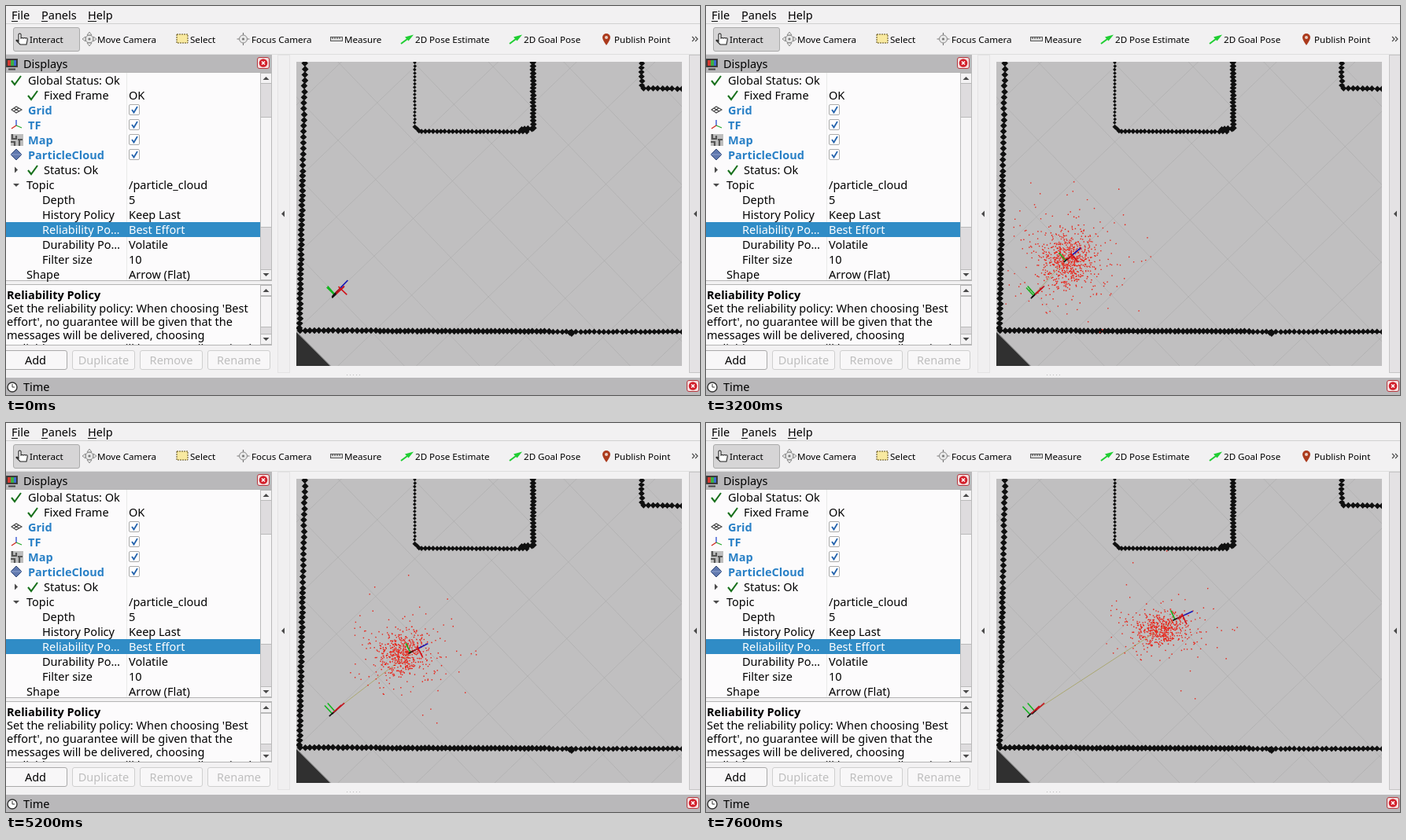
An HTML page for the animation above (7700 ms loop, 882x495 px).

```html
<!DOCTYPE html>
<html lang="en">
<head>
<meta charset="utf-8">
<style>
  html, body { margin: 0; width: 100%; height: 100%; overflow: hidden; background: #f2f1f2; }
  svg { display: block; width: 882px; height: 495px; font: 14.5px "Noto Sans", sans-serif; }
  text { white-space: pre; fill: #000; }
  .tool { font-size: 11.6px; }
  .link { font-weight: bold; fill: #2980c6; }
  .bold { font-weight: bold; }
  .light { fill: #fff; }
  .off { fill: #bebebe; }
  .mid { text-anchor: middle; }
</style>
</head>
<body>
<svg viewBox="0 0 882 495">
  <defs>
    <clipPath id="view"><rect x="369" y="71" width="490" height="387"/></clipPath>
    <clipPath id="help"><rect x="0" y="356" width="322" height="75"/></clipPath>
  </defs>
  <g id="panel"></g>
  <g clip-path="url(#view)">
    <rect x="369" y="71" width="490" height="387" fill="#c0bfc0"/>
    <path id="grid" stroke="#aaa" stroke-opacity=".6" fill="none"/>
    <path d="M369 415L412 458H369Z" fill="#303030"/>
    <path d="M369 414.5L412.5 458" stroke="#777"/>
    <path id="walls" fill="#101010"/>
    <path id="link" stroke="#a6a25e" stroke-opacity=".8" fill="none"/>
    <path id="cloud" stroke="#e8261b" stroke-width="1.4" fill="none"/>
    <g id="frames" fill="none"></g>
  </g>
</svg>
<script>
const $ = id => document.getElementById(id);

function seeded(seed) {
  return () => {
    seed = (seed * 1664525 + 1013904223) >>> 0;
    return (seed + .5) / 4294967296;
  };
}

// Panel markup
const titleColor = '#b9b8ba';
const rect = (x, y, w, h, fill, extra = '') =>
  `<rect x="${x}" y="${y}" width="${w}" height="${h}" fill="${fill}" ${extra}/>`;
const text = (x, y, s, cls = '') => `<text x="${x}" y="${y}" class="${cls}">${s}</text>`;
const path = (d, stroke, width = 1, fill = 'none') =>
  `<path d="${d}" stroke="${stroke}" stroke-width="${width}" fill="${fill}"/>`;
const tick = (x, y) => path(`M${x} ${y}l4 5l8-11`, '#18701c', 2.1);
const closeBox = (x, y) => rect(x, y, 15, 14, '#f4dfe0', 'rx="2.5" stroke="#b5383f"') +
  `<circle cx="${x + 7.5}" cy="${y + 7}" r="5.3" fill="#d3202b"/>` +
  path(`M${x + 5.5} ${y + 5}l4 4m0-4l-4 4`, '#fff', 1.5);
const triangle = (x, y, angle, size = 4) =>
  `<path d="M${size / 2} 0L${-size / 2} ${-size}V${size}Z" transform="translate(${x} ${y}) rotate(${angle})" fill="#4a4a4a"/>`;

function scrollbar(top, bottom, from, to) {
  return rect(323.5, top + .5, 14, bottom - top - 1, '#dedcde', 'stroke="#bbb"') +
    rect(323.5, from + .5, 14, to - from, '#f5f4f5', 'stroke="#bababa"') +
    rect(323.5, top + .5, 14, 13, '#f3f2f3', 'stroke="#bababa"') +
    rect(323.5, bottom - 13.5, 14, 13, '#f3f2f3', 'stroke="#bababa"') +
    triangle(330.5, top + 7, -90) + triangle(330.5, bottom - 7, 90);
}

function toolbar() {
  const arrow = x => path(`M${x} 48l8-6`, '#1fce32', 2) +
    `<path d="M${x + 5} 39.5l11-3-6.5 8Z" fill="#1fce32"/>`;
  const target = (x, y) => path(`M${x - 8} ${y}h16M${x} ${y - 8}v16`, '#777', 1.2) +
    `<circle cx="${x}" cy="${y}" r="5" fill="#e8e8e8" stroke="#888"/>` +
    `<circle cx="${x}" cy="${y}" r="1.6" fill="#777"/>`;
  const labels = [[30, 'Interact'], [116, 'Move Camera'], [234, 'Select'], [312, 'Focus Camera'],
    [430, 'Measure'], [520, '2D Pose Estimate'], [658, '2D Goal Pose'], [773, 'Publish Point']];
  return rect(9.5, 27.5, 84, 30, '#d6d5d6', 'rx="2.5" stroke="#aaa"') +
    path('M16 45V36q1.5-2 3 0v5q2-1 3 0 2-1 3 0 3-1 2 3l-1 5h-8l-5-5q0-2 3 1Z', '#222', 1.1, '#fff') +
    target(106, 42) + path('M106 33l-3 4h6ZM106 51l-3-4h6ZM97 42l4-3v6ZM115 42l-4-3v6Z', '#777', .8, '#eee') +
    rect(217, 36, 14, 11, '#f8e9a0', 'stroke="#5c4d16" stroke-dasharray="2 1"') +
    target(301.5, 42) +
    rect(412.5, 39.5, 15, 5, '#ddd', 'stroke="#555"') + path('M415 40v2m3-2v2m3-2v2m3-2v2', '#333') +
    arrow(502) + arrow(640) +
    '<path d="M763 50q-5-7-5-10a5 5 0 0 1 10 0q0 3-5 10Z" fill="#ab3a1c"/><circle cx="763" cy="40" r="2" fill="#e8cfc4"/>' +
    path('M872 39l3 3-3 3m4-6l3 3-3 3', '#444', 1.1) +
    labels.map(([x, s]) => text(x, 47, s, 'tool')).join('');
}

function tree() {
  const rows = [
    [28, 'Global Status: Ok'], [48, 'Fixed Frame', 'OK'], [28, 'Grid', true], [28, 'TF', true],
    [28, 'Map', true], [28, 'ParticleCloud', true], [48, 'Status: Ok'],
    [26, 'Topic', '/particle_cloud'], [46, 'Depth', '5'], [46, 'History Policy', 'Keep Last'],
    [46, 'Reliability Po…', 'Best Effort'], [46, 'Durability Po…', 'Volatile'],
    [46, 'Filter size', '10'], [26, 'Shape', 'Arrow (Flat)']];
  let out = rect(-.5, 84.5, 338, 265, '#fcfbfc', 'stroke="#b5b5b5"') +
    path('M153.5 85V349', '#e9e9e9') + rect(0, 275, 323, 19, '#308cc6');
  rows.forEach(([x, label, value], i) => {
    const y = 100 + 19 * i, box = value === true, cls = i === 10 ? 'light' : '';
    out += text(x, y, label, box ? 'link' : cls);
    if (box) out += rect(156.5, y - 12.5, 13, 13, '#fff', 'rx="1.5" stroke="#aaa"') +
      path(`M160 ${y - 6}l2.5 3.5 4.5-7.5`, '#2463ad', 1.8);
    else if (value) out += text(156, y, value, cls);
  });
  return out + tick(7, 95) + tick(28, 114) + tick(28, 209) +
    triangle(13, 208.5, 0) + triangle(13, 228, 90) +
    path('M7 132l6-4 7 4-7 4ZM10 130l7 4M10 134l6-4', '#444', 1.1) +
    path('M13 152V145', '#2648d0', 1.3) + path('M13 152l-6 4', '#d02a22', 1.3) + path('M13 152l7 3', '#26a82c', 1.3) +
    rect(6, 163, 16, 15, '#bdbdbd') + path('M8 163v6h5v-4M6 173h5v5M15 170h6M17 170v8', '#555', 2.2) +
    path('M13 182l7 7-7 7-7-7Z', '#354b78', 1, '#6078ae') + path('M6 189h14', '#8fa2cc') +
    scrollbar(85, 349, 141, 281);
}

function help() {
  const lines = ["Set the reliability policy: When choosing 'Best", "effort', no guarantee will be given that the",
    'messages will be delivered, choosing', "'Reliable', messages will be sent until received"];
  return rect(-.5, 354.5, 338, 77, '#fcfbfc', 'stroke="#b5b5b5"') +
    '<g clip-path="url(#help)">' + text(1, 373, 'Reliability Policy', 'bold') +
    lines.map((s, i) => text(1, 390 + 17 * i, s)).join('') + '</g>' + scrollbar(355, 431, 369, 408);
}

function buildPanel() {
  const buttons = [[-2.5, 80, 'Add'], [84.5, 79, 'Duplicate'], [170.5, 79, 'Remove'], [256.5, 79, 'Rename']];
  const clock = (x, y) => `<circle cx="${x}" cy="${y}" r="6" fill="#fff" stroke="#333" stroke-width="1.4"/>` +
    path(`M${x} ${y - 4}v4h3`, '#333');
  $('panel').innerHTML = rect(0, 0, 882, 495, '#f2f1f2') + path('M0 22.5H882', '#d0d0d0') +
    [[7, 'File', 8], [45, 'Panels', 8], [104, 'Help', 11]].map(([x, s, w]) =>
      text(x, 17, s) + path(`M${x} 19.5h${w}`, '#111')).join('') +
    toolbar() + path('M0 61.5H882', '#dedede') +
    rect(0, 62, 338, 22, titleColor) + text(22, 79, 'Displays') +
    rect(.5, 67.5, 14, 10, '#333', 'stroke="#444"') + rect(2, 69, 4, 7, '#d33b31') +
    rect(6, 69, 4, 7, '#3bae43') + rect(10, 69, 3, 7, '#3f6bd0') + path('M3 80.5h9', '#444', 2) +
    closeBox(319.5, 65.5) + tree() + help() +
    buttons.map(([x, w, s], i) => rect(x, 438.5, w, 24, '#f8f7f8', `rx="2.5" stroke="${i ? '#cfcfcf' : '#aaa'}"`) +
      text(x + w / 2, 456, s, i ? 'mid off' : 'mid')).join('') +
    rect(345.5, 62.5, 15, 404, '#f0eff0', 'stroke="#e4e3e4"') + triangle(352, 264.5, 180) +
    rect(868.5, 62.5, 16, 404, '#e4e2e4', 'stroke="#c6c5c6"') + triangle(876, 264.5, 180) +
    path('M433 469.5h1m3 0h1m3 0h1m3 0h1m3 0h1', '#bbb') +
    rect(0, 473, 882, 22, titleColor) + clock(8, 485) + text(22, 490, 'Time') + closeBox(865.5, 476.5);
}

// Map: a rotated square grid and walls made of small diamonds
function buildMap() {
  const c = Math.cos(.765), s = Math.sin(.765), step = 69;
  let grid = '';
  for (let i = -8; i <= 10; i++) {
    const d = i * step, at = (a, b) => `${418 + a * c + b * s} ${366 - a * s + b * c}`;
    grid += `M${at(d, -700)}L${at(d, 700)}M${at(-700, d)}L${at(700, d)}`;
  }
  $('grid').setAttribute('d', grid);

  const rand = seeded(7);
  let walls = '';
  const wall = (x1, y1, x2, y2, pitch, r, jitter = 1) => {
    const n = Math.max(1, Math.round(Math.hypot(x2 - x1, y2 - y1) / pitch));
    for (let i = 0; i <= n; i++) {
      const k = i / n, j = (rand() - .5) * jitter;
      const x = x1 + (x2 - x1) * k + j, y = y1 + (y2 - y1) * k + j * .5;
      walls += `M${x} ${y - r}l${r} ${r}l${-r} ${r}l${-r} ${-r}Z`;
    }
  };
  wall(380, 73, 377, 210, 7.3, 4.3);
  wall(377, 216, 373, 410, 6.2, 4.5);
  wall(374, 413, 470, 413, 6, 4.3);
  wall(475, 413.5, 690, 414, 5.2, 4.3);
  wall(695, 414.5, 859, 414.5, 5.8, 3.8);
  wall(717, 416, 719, 417, 2, 4);
  wall(519.5, 72, 519.5, 153, 4.5, 2.3, .5);
  wall(520, 154, 525, 159, 3, 3.2);
  wall(528, 159.5, 662, 160, 5, 3.4, .6);
  wall(655, 157, 668, 156, 5, 4.3);
  wall(670, 72, 670, 155, 4.6, 4.3, .8);
  wall(808, 73, 808, 101, 5.5, 4);
  wall(810, 104.5, 859, 105.5, 6, 4);
  $('walls').setAttribute('d', walls);
}

// Rows: time, then x, y, heading
const robotKeys = [[1700, 417, 367, 46], [2300, 433, 350, 45], [3200, 457, 324, 40], [4500, 490, 303, 28],
  [5200, 514, 292, 27], [6600, 563, 267, 27], [7600, 596, 250, 25]];
// Rows: time, then centre x, y, spread x, y, particle count
const cloudKeys = [[1800, 424, 364, 35, 36, 950], [2300, 437, 348, 32, 32, 900], [3200, 459, 324, 26, 26, 760],
  [4500, 487, 304, 23, 20, 620], [5200, 503, 294, 23, 20, 580], [6600, 563, 270, 24, 18, 540],
  [7600, 577, 263, 24, 15, 530]];

function sample(keys, t) {
  if (t <= keys[0][0]) return keys[0].slice(1);
  const i = keys.findIndex(k => k[0] >= t);
  const a = keys[i - 1], b = keys[i], k = (t - a[0]) / (b[0] - a[0]);
  return a.slice(1).map((v, n) => v + (b[n + 1] - v) * k);
}

const strays = [[8, -100], [94, 1], [-35, -85], [72, 23], [26, 78], [44, 88], [-60, 30]];
const random = seeded(41);
const particles = Array.from({ length: 950 }, () => {
  const spread = random() < .62 ? .62 : 1.35;
  const r = spread * Math.sqrt(-2 * Math.log(random())), a = random() * 2 * Math.PI;
  return [r * Math.cos(a), r * Math.sin(a), random() * 1.2 - .6];
});

function cloudPath(t) {
  const [cx, cy, sx, sy, count] = sample(cloudKeys, t);
  const dash = (x, y, slope) => `M${x.toFixed(1)} ${y.toFixed(1)}l1.4 ${slope.toFixed(1)}`;
  return particles.slice(0, count).map(([x, y, slope]) => dash(cx + x * sx, cy + y * sy, slope)).join('') +
    strays.map(([x, y]) => dash(cx + x, cy + y, -.4)).join('');
}

function axes(x, y, angle, ahead) {
  const c = Math.cos(angle), s = Math.sin(angle);
  const line = (a1, b1, a2, b2, color) => path(
    `M${x + a1 * c - b1 * s} ${y - a1 * s - b1 * c}L${x + a2 * c - b2 * s} ${y - a2 * s - b2 * c}`, color, 1.6);
  return ahead
    ? line(0, 0, 0, 13, '#12b51d') + line(-3, 0, 7, 0, '#111') + line(3, 0, 12, 0, '#b5111c') +
      line(11, 0, 25, 0, '#1515b8') + line(11, 3, 11, -12, '#d01018')
    : line(0, 0, 0, 14, '#12b51d') + line(-5, 0, 3, 0, '#111') + line(2, 0, 16, 0, '#c51520');
}

function draw(t) {
  const [x, y, heading] = sample(robotKeys, t);
  const moving = t >= 1800, drift = moving ? (t - 1800) / 5800 : 0;
  $('cloud').setAttribute('d', moving ? cloudPath(t) : '');
  $('link').setAttribute('d', t > 2200 ? `M418 366L${x} ${y}` : '');
  $('frames').innerHTML = axes(418, 367, .72, false) +
    axes(418 - 6 * drift, 368 + 3 * drift, .75, false) + axes(x, y, heading * Math.PI / 180, true);
}

buildPanel();
buildMap();
let shown = -1;
function tickFrame(now) {
  const t = Math.floor(now % 7700 / 100) * 100;
  if (t !== shown) draw(shown = t);
  requestAnimationFrame(tickFrame);
}
tickFrame(0);
</script>
</body>
</html>
```
